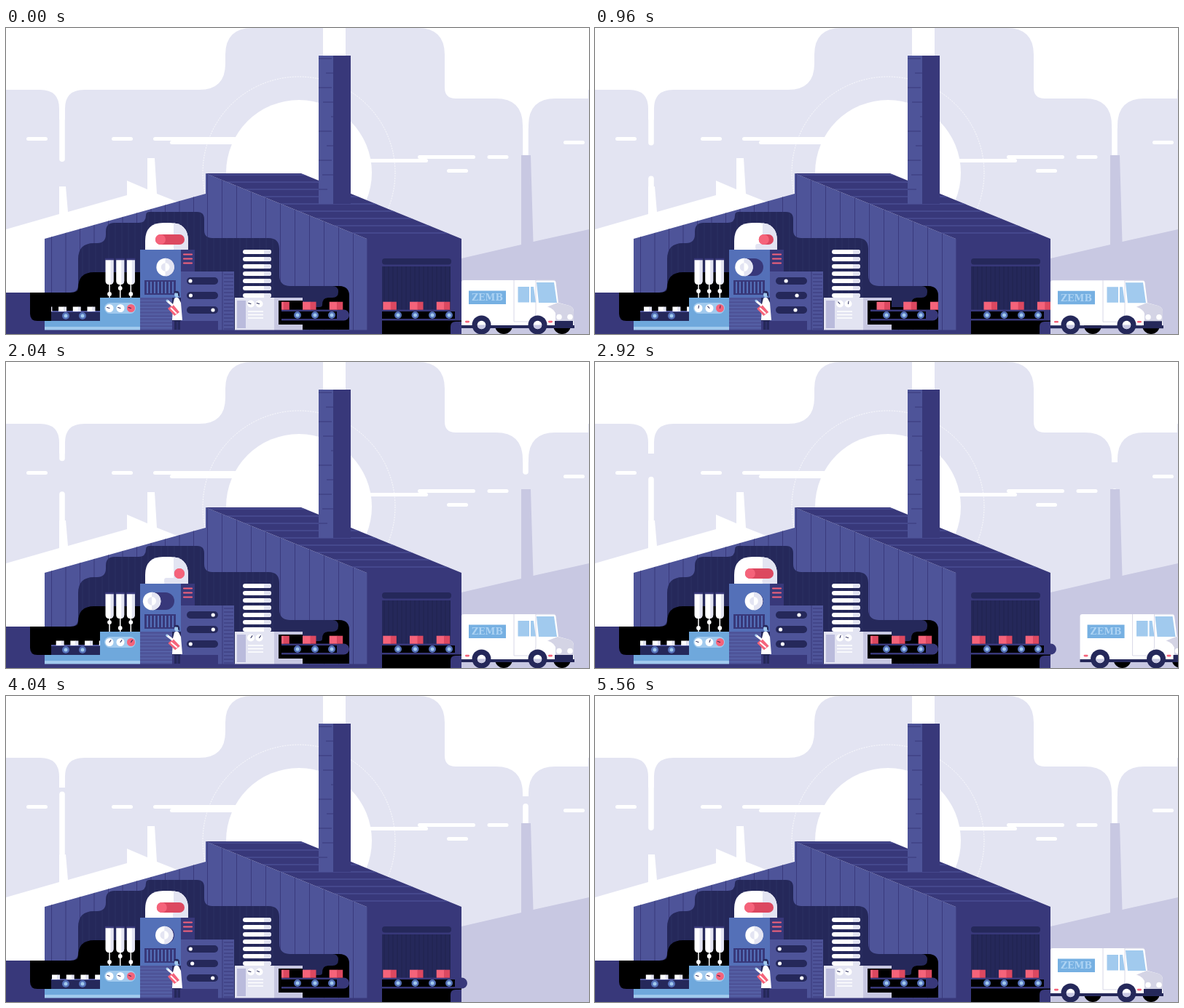
Recreate the animation shown at these times as an HTML page. Size 800 by 421 pixels, loop 5600 ms.

```html
<!DOCTYPE html>
<html lang="en">
<head>
<meta charset="utf-8">
<title>Factory</title>
<style>
html, body { margin: 0; width: 100%; height: 100%; overflow: hidden; background: #fff; }
svg { display: block; width: 100vw; height: 100vh; }
.sky { fill: #e3e4f2; } .white { fill: #fff; } .haze { fill: #c8c8e2; }
.wall { fill: #4e5499; } .deep { fill: #38387a; } .night { fill: #25285a; }
.blue { fill: #6fa8dc; } .pale { fill: #a1caee; } .mid { fill: #5470b8; }
.red { fill: #f5637a; } .crimson { fill: #dc4860; }
.smoke { stroke: #fff; stroke-width: 7.6; stroke-linecap: round; }
.needle { stroke: #25285a; stroke-width: 1; stroke-linecap: round; }
</style>
</head>
<body>
<svg viewBox="0 0 800 421" preserveAspectRatio="none">
<defs>
  <clipPath id="wallClip"><path d="M53 290 274 228V200L495 290V416H53Z"/></clipPath>
  <clipPath id="roofClip"><path d="M274 200H405L625 290H495Z"/></clipPath>
  <clipPath id="roomClip"><path id="roomShape" d="M62 364H88Q99 364 99 353V318Q99 296 121 296H125Q137 296 137 284V280Q137 268 149 268H182Q192 268 192 258Q192 253 197 253H262Q272 253 272 263V278Q272 289 283 289H360Q375 289 375 304V340Q375 355 390 355H457Q471 355 471 369V415H62Z"/></clipPath>
  <clipPath id="leftBelt"><rect x="62" y="375" width="68" height="20"/></clipPath>
  <clipPath id="midBelt"><rect x="378" y="370" width="93" height="20"/></clipPath>
  <clipPath id="dockBelt"><rect x="516" y="370" width="130" height="20"/></clipPath>
  <clipPath id="dome"><path id="domeShape" d="M191 305V293Q191 268 216 268H225Q250 268 250 293V305Z"/></clipPath>
</defs>

<path class="sky" d="M0 85H47Q73 85 73 111V218H81V111Q81 85 107 85H265Q301 85 301 49V37Q301 0 338 0H435V60H466V0H565Q602 0 602 37V82Q602 97 617 97H672Q709 97 709 134V220H717V134Q717 97 754 97H799V85H800V330H0Z"/>
<path class="sky" d="M73 126H81V230H73ZM709 138H717V230H709Z"/>
<path d="M77 85V122M713 97V134" class="smoke"/>
<g id="smoke"></g>
<g class="white">
  <circle cx="402" cy="199" r="100"/>
  <circle cx="402" cy="199" r="132" fill="none" stroke="#fff" stroke-width=".8" stroke-dasharray="2 1.5"/>
  <g id="clouds"></g>
  <path d="M0 277 73 256V218H82L85 253 166 230V210L194 222V179H204L207 228 240 241V364H0Z"/>
</g>
<path class="haze" d="M625 317 707 298V175H720L723.500 294 800 277V421H625Z"/>

<path class="deep" d="M0 364H53V415H516V421H0Z"/>
<path class="wall" d="M53 290 274 228V200L495 290V416H53Z"/>
<path id="wallLines" clip-path="url(#wallClip)" stroke="#38387a" stroke-width=".9"/>
<path class="deep" d="M274 200H405L625 290V421H495V290Z"/>
<path id="roofLines" clip-path="url(#roofClip)" stroke="#5259a0" stroke-width="1"/>
<path d="M495 290V416" stroke="#4e5499" stroke-width=".8"/>
<path class="wall" d="M429 38H449V242H429Z"/>
<path class="deep" d="M449 38H473V242H449Z"/>
<path d="M429 42H447M439 62H449M429 82H447M435 102H449M446 122H449M429 142H447M440 162H449M429 182H447M434 202H449M429 222H441" stroke="#38387a"/>

<!-- Interior -->
<path d="M33 364H70V403H43Q33 403 33 393Z"/>
<use href="#roomShape" class="night"/>
<path id="roomLines" clip-path="url(#roomClip)" stroke="#303469" stroke-width=".7"/>
<path d="M62 364H88Q99 364 99 358Q99 336 121 336H184V403H62Z"/>
<path d="M373 375H434Q434 371 442 371H448Q456 371 456 363Q456 355 448 355H457Q471 355 471 369V415H373Z"/>
<path class="night" d="M407 371H442Q434 371 434 381Q434 384 430 384H407Z"/>

<rect class="blue" x="53" y="403" width="131" height="8"/>
<rect class="pale" x="53" y="411" width="131" height="5"/>
<rect class="night" x="62" y="389" width="68" height="14"/>
<path d="M62 390H130" stroke="#4e5499" stroke-width="2"/>
<g id="parcels" clip-path="url(#leftBelt)"></g>
<g id="syringes"></g>
<rect class="blue" x="129" y="371" width="55" height="40"/>
<rect class="pale" x="135" y="378" width="43" height="15" rx="7.500"/>
<g class="white"><circle cx="142" cy="385.500" r="5.500"/><circle cx="157" cy="385.500" r="5.500"/></g>
<circle class="red" cx="171.500" cy="385.500" r="5.500"/>

<rect class="mid" x="184" y="305" width="56" height="66"/>
<rect class="deep" x="240" y="305" width="19" height="31"/>
<path d="M244 311.500H255M244 317.500H255M244 323.500H255" stroke="#f5637a" stroke-width="2.200" stroke-linecap="round"/>
<use href="#domeShape" class="white"/>
<g clip-path="url(#dome)" class="sky"><rect x="230" y="266" width="22" height="40"/><rect id="slab" y="297" height="9" rx="3"/></g>
<rect id="redPill" class="crimson" y="284" height="14" rx="7"/>
<circle id="redKnob" class="red" cy="291" r="7"/>
<rect id="dialSlot" class="deep" y="317" height="24" rx="12"/>
<g id="dial"><circle class="white" r="12.300"/><path class="sky" d="M0-12.300A12.300 12.300 0 0 1 0 12.300V6A6 6 0 0 0 0-6Z"/><circle class="sky" r="5.800"/><path class="white" d="M0-5.800A5.800 5.800 0 0 1 0 5.800Z"/></g>
<rect class="deep" x="190" y="347" width="43" height="20"/>
<path id="vent" stroke="#5470b8" stroke-width="2"/>
<rect class="wall" x="184" y="371" width="44" height="45"/>
<path id="grille" stroke="#5b6ab0"/>

<rect class="wall" x="240" y="335" width="73" height="81"/>
<rect class="deep" x="228" y="403" width="63" height="13"/>
<path id="louvres" stroke="#38387a"/>
<path d="M297 335V416" stroke="#38387a"/>
<g id="sliders"></g>
<g id="stack"></g>
<rect class="sky" x="314" y="371" width="54" height="45"/>
<rect x="317" y="375" width="12" height="38" fill="#babbdc"/>
<path class="haze" d="M368 371H407V375H374V408H407V416H368Z"/>
<g class="white"><circle cx="336" cy="379.500" r="5"/><circle cx="347.500" cy="379.500" r="5"/></g>
<path d="M332 390H353M332 394.500H353M332 399H353" stroke="#fff" stroke-width="1.500"/>
<g id="needles"></g>

<!-- Worker -->
<path class="night" d="M231 400H239V415H235.500V404H234.500V415H231Z"/>
<path class="white" d="M231 372Q234 369 237 372L240 378 242 402H228L229 380Z"/>
<circle class="pale" cx="234.500" cy="367" r="3.400"/>
<path class="night" d="M230 364Q232 361 236 362Q239 364 238 370L236 368V365Z"/>
<g id="clipboard"><path class="red" d="M222 386 229 380 238 391 231 396Z"/><path d="M226 385 234 393" stroke="#fff" stroke-width="2"/><path d="M221 375 229 382" stroke="#fff" stroke-width="3"/><circle class="pale" cx="221" cy="375" r="1.500"/></g>
<rect class="deep" x="0" y="415.500" width="516" height="5.500"/>

<!-- Loading dock -->
<rect class="night" x="516" y="317" width="95" height="8.500" rx="4"/>
<rect class="night" x="516" y="328" width="94" height="60"/>
<path id="dockLines" stroke="#1f214c" stroke-width=".8"/>
<path d="M516 388H625V404H617Q610 404 610 411V421H516Z"/>
<g id="conveyors"></g>
<g id="midBoxes" clip-path="url(#midBelt)"></g>
<g id="dockBoxes" clip-path="url(#dockBelt)"></g>

<!-- Van -->
<g id="van">
  <circle cx="683" cy="409" r="12"/><circle cx="763" cy="409" r="12"/>
  <g id="vanBody">
    <path class="white" d="M625 350Q625 347 628 347H751Q754 347 754.500 350L758 378 773 382Q779 384 779 390V409H625Z"/>
    <path d="M757 378 773 382Q779 384 779 390V403H754V392L739 385Z" fill="#d4d4e5"/>
    <path d="M727 379Q754 384 754 394V409H727Z" class="white"/>
    <path d="M697 347V404H720Q727 399 727 391V347M727 347H753" fill="none" stroke="#d4d4e5" stroke-width=".9"/>
    <path class="pale" d="M728 350H752L756 378H731ZM702.500 356H718V377.500H702.500ZM720 356H724L727 377.500H720Z"/>
    <rect x="635" y="361.500" width="51" height="18.500" fill="#76b0e2"/>
    <text x="660.500" y="375.300" text-anchor="middle" font-family="'DejaVu Serif','Noto Serif',serif" font-weight="700" font-size="12.500" fill="#add3f3">ZEMB</text>
    <g class="white"><circle cx="759" cy="397.500" r="3.800"/><circle cx="774" cy="397.500" r="3.800"/></g>
    <rect class="red" x="630" y="402.800" width="6" height="2.600" rx="1.300"/>
    <rect class="red" x="744" y="402.800" width="6" height="2.600" rx="1.300"/>
    <path class="night" d="M625 409H753V403H778V409H780V413H625Z"/>
  </g>
  <g id="wheels"></g>
</g>
</svg>

<script>
const LOOP = 5600;
const $ = id => document.getElementById(id);
const range = n => [...Array(n).keys()];
const fill = (id, list, draw) => { $(id).innerHTML = list.map(draw).join(''); };
const lines = (id, list, draw) => $(id).setAttribute('d', list.map(draw).join(''));
const set = (el, attrs) => { for (const k in attrs) el.setAttribute(k, attrs[k]); };
const shift = (el, x, y = 0) => el.setAttribute('transform', `translate(${x} ${y})`);
const rect = (cls, x, y, w, h, r = 0) => `<rect class="${cls}" x="${x}" y="${y}" width="${w}" height="${h}" rx="${r}"/>`;
const disc = (cls, x, y, r) => `<circle class="${cls}" cx="${x}" cy="${y}" r="${r}"/>`;

// Static repeats
fill('clouds', [[28, 150, 29], [145, 150, 29], [202, 150, 118], [225, 155, 95], [490, 180, 89],
  [565, 175, 79], [660.5, 175, 29], [605, 194, 29], [765, 155, 29]], ([x, y, w]) => rect('', x, y, w, 5, 2.5));
lines('wallLines', range(22), i => `M${i < 11 ? 62.5 + 19.5 * i : 276.5 + 20 * (i - 11)} 200V416`);
lines('roofLines', range(9), i => `M270 ${202 + i * 10}H626`);
lines('roomLines', range(30), i => `M${105 + i * 9} 253V371`);
lines('vent', range(8), i => `M${194 + i * 5} 349V365`);
lines('grille', range(9), i => `M184 ${375 + i * 4.7}H228`);
lines('louvres', range(16), i => `M299 ${339 + i * 5}H312`);
lines('dockLines', range(16), i => `M${519 + i * 6} 328V388`);
fill('stack', range(7), i => rect('white', 325, 305 + i * 10, 39, 6, 3) +
  `<path class="sky" d="M354 ${305 + i * 10}h7a3 3 0 0 1 0 6h-7z"/>`);
const roller = (x, y) => disc('mid', x, y, 5) + disc('pale', x, y, 2.5);
const conveyor = (x, end, inner) =>
  `<path class="deep" d="M${x} 387.5H${end - 7.5}a7.5 7.5 0 0 1 0 15H${x}z"/>` + rect('', x, 390, inner - x, 10);
fill('conveyors', [0], () => conveyor(378, 471, 454) + conveyor(516, 633, 616) +
  [400, 424, 447, 538, 561.5, 585, 608].map(x => roller(x, 395)).join('') +
  [82, 105].map(x => roller(x, 396)).join(''));
fill('wheels', [652.5, 729.5], x => disc('night', x, 408.5, 13) + disc('white', x, 408.5, 5.8) +
  `<path class="haze" d="M${x - 5.8} 408.500a5.800 5.800 0 0 0 11.600 0z"/>`);

// Moving repeats
const carton = x => rect('red', x, 376.7, 11, 11) + rect('crimson', x + 10.5, 376.7, 8, 11);
fill('midBoxes', range(6), i => carton(370.3 + (i - 3) * 36.7));
fill('dockBoxes', range(6), i => carton(517.3 + (i - 3) * 36.7));
fill('parcels', range(6), i => rect('white', 52.3 + (i - 1) * 19.7, 383.5, 7.5, 6.5) + rect('sky', 59.3 + (i - 1) * 19.7, 383.5, 4, 6.5));
fill('syringes', [142, 156.7, 171.3], x => `<path d="M${x} 350V371" stroke="#fff" stroke-width="1.500"/>` +
  `<circle class="white ball" cx="${x}" r="2.900"/>` +
  `<path class="white" d="M${x - 5.5} 319h11v29q0 5-5 5h-1q-5 0-5-5z"/>` +
  `<path class="sky" d="M${x + 1.5} 319h4v29q0 4-4 4.500z"/>` + rect('deep', x - 6, 316.8, 12, 2.5));
fill('sliders', [343, 363, 383], y => rect('night', 248, y, 43, 10, 5) + `<circle class="white knob" cy="${y + 5}" r="2.600"/>`);
fill('needles', [[142, 385.5], [157, 385.5], [171.5, 385.5], [336, 379.5], [347.5, 379.5]],
  ([x, y]) => `<path class="needle" data-x="${x}" data-y="${y}" d="M${x} ${y}v-3.500"/>`);
fill('smoke', range(6), () => '<path class="smoke"/>');

const balls = document.querySelectorAll('.ball');
const knobs = document.querySelectorAll('.knob');
const needles = document.querySelectorAll('.needle');
const puffs = $('smoke').children;

// Eased back-and-forth between 0 and 1
function swing(t, period) {
  const u = 1 - Math.abs(t % period / period * 2 - 1);
  return u < .5 ? .5 * (2 * u) ** 2.5 : 1 - .5 * (2 - 2 * u) ** 2.5;
}

function vanOffset(t) {
  if (t < 2290) return 0;
  if (t < 3490) return 279 * ((t - 2290) / 1200) ** 3;
  return t < 4000 ? 279 : 279 * Math.max(0, (5000 - t) / 1000) ** 3;
}

function drawSmoke(t) {
  const rise = t / LOOP * 131;
  range(6).forEach(i => {
    const right = i > 2;
    const gapTop = (right ? 202.5 : 184) - rise + (i % 3 - 1) * 131;
    const top = Math.max(right ? 110 : 95, gapTop + (right ? 40 : 42) + 3.8);
    const bottom = Math.min(260, gapTop + 131 - 3.8);
    puffs[i].setAttribute('d', bottom > top ? `M${right ? 713 : 77} ${top}V${bottom}` : '');
  });
}

function draw(t) {
  const slow = swing(t, 1400), fast = swing(t, 800);
  drawSmoke(t);
  shift($('parcels').firstChild.parentNode, 0);
  [...$('parcels').children].forEach(el => shift(el, t / 350 % 1 * 19.7));

  const advance = t < 2000 ? t / 2000 * 3 % 1 * 36.7 : 0;
  for (const id of ['midBoxes', 'dockBoxes'])
    for (const el of $(id).children) shift(el, advance);

  balls.forEach((el, i) => {
    const dip = slow ** 2.5 * 8;
    el.setAttribute('cy', i === 1 ? 358 + dip : 366 - dip);
  });
  const knobX = 212 + 26 * slow;
  set($('redKnob'), { cx: knobX });
  set($('redPill'), { x: knobX - 7, width: 252 - knobX });
  set($('slab'), { x: 230 - 13 * slow, width: 20 });
  const dialX = 218.6 - 18.6 * slow;
  shift($('dial'), dialX, 329);
  set($('dialSlot'), { x: dialX - 12, width: 243 - dialX });
  [253 + 31.5 * fast, 253.5 + 31 * slow, 284 - 31 * fast].forEach((x, i) => knobs[i].setAttribute('cx', x));
  needles.forEach((el, i) => {
    const angle = -75 + 110 * (i % 2 ? fast : slow);
    el.setAttribute('transform', `rotate(${angle} ${el.dataset.x} ${el.dataset.y})`);
  });
  $('clipboard').setAttribute('transform', `rotate(${-4 * fast} 236 380)`);

  shift($('van'), vanOffset(t));
  const sinceHit = (t - 273) % 667;
  const bump = t > 273 && t < 2000 && sinceHit < 300 ? Math.sin(sinceHit / 300 * Math.PI) : 0;
  shift($('vanBody'), 0, bump);
}

const start = performance.now();
function tick() {
  draw((performance.now() - start) % LOOP);
  requestAnimationFrame(tick);
}
tick();
</script>
</body>
</html>
```
